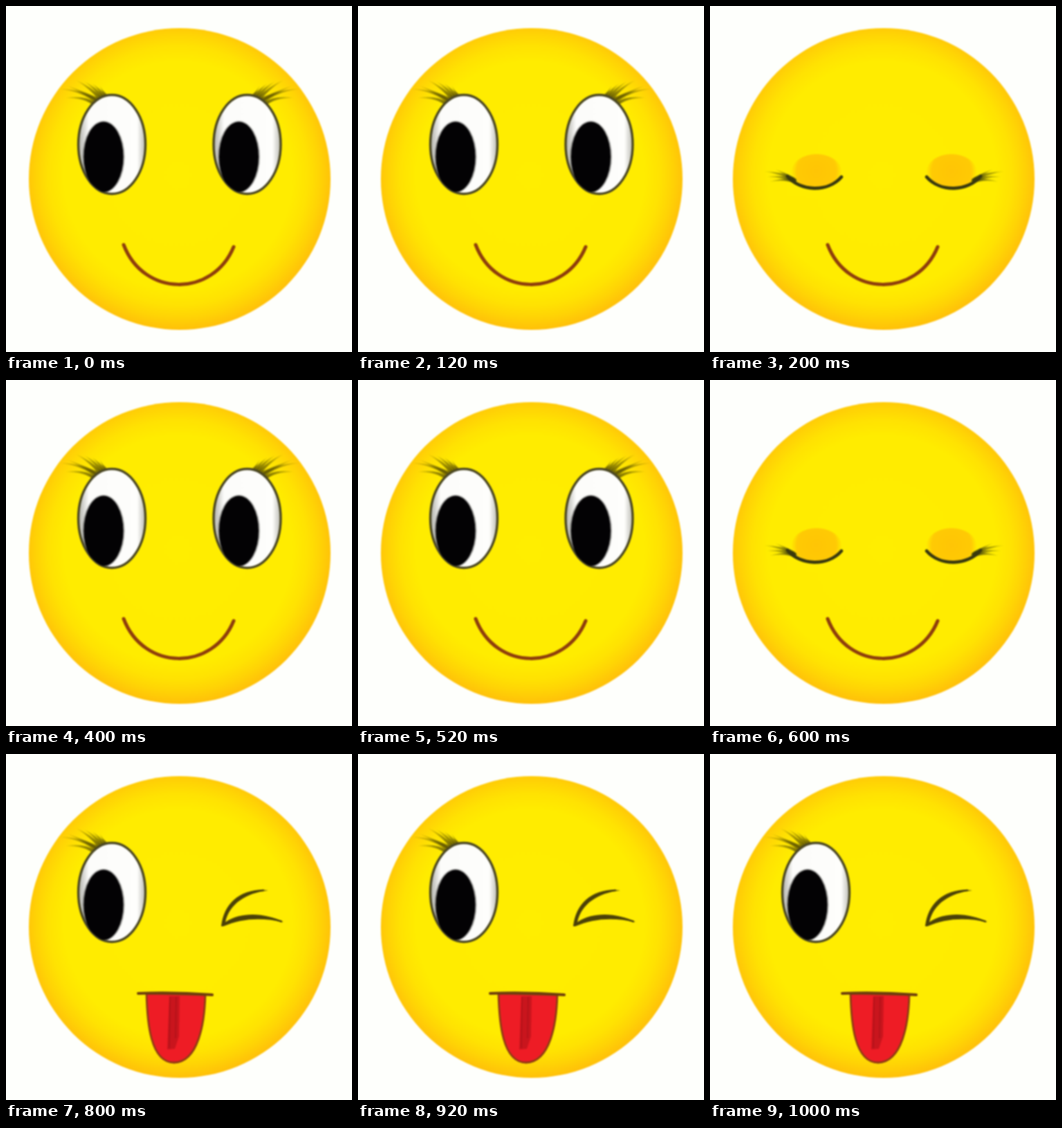
Write an HTML page with a canvas that moves like this. It is 500 px wide and 500 px high and loops after 1200 ms.

```html
<!DOCTYPE html>
<html lang="en">
<head>
<meta charset="utf-8">
<title>Winking smiley</title>
<style>
  html, body { margin: 0; width: 100%; height: 100%; overflow: hidden; background: #fefffc; }
  canvas { display: block; width: 100vw; height: 100vh; filter: blur(1.1px); }
</style>
</head>
<body>
<canvas id="stage" width="500" height="500"></canvas>
<script>
const ctx = document.getElementById('stage').getContext('2d');
const STEP = 200;
const POSES = ['open', 'closed', 'open', 'closed', 'wink', 'wink'];

function stroke(path, color, width) {
  ctx.strokeStyle = color;
  ctx.lineWidth = width;
  ctx.lineCap = 'round';
  ctx.lineJoin = 'round';
  ctx.stroke(new Path2D(path));
}

function ellipse(x, y, rx, ry, fill) {
  ctx.beginPath();
  ctx.ellipse(x, y, rx, ry, 0, 0, Math.PI * 2);
  ctx.fillStyle = fill;
  ctx.fill();
}

function radial(x, y, r, stops) {
  const g = ctx.createRadialGradient(x, y, 0, x, y, r);
  for (const [at, color] of stops) g.addColorStop(at, color);
  return g;
}

// Draws on the right half by reflecting the left half.
function mirrored(axis, draw) {
  ctx.save();
  ctx.translate(axis * 2, 0);
  ctx.scale(-1, 1);
  draw();
  ctx.restore();
}

// Tapered hair from root to tip, fading out.
function lash(x, y, cx, cy, tx, ty, w, color) {
  const g = ctx.createLinearGradient(x, y, tx, ty);
  g.addColorStop(0, `rgba(${color},0.8)`);
  g.addColorStop(0.5, `rgba(${color},0.5)`);
  g.addColorStop(1, `rgba(${color},0.08)`);
  ctx.fillStyle = g;
  ctx.beginPath();
  ctx.moveTo(x - w / 2, y + w / 2);
  ctx.quadraticCurveTo(cx, cy + w / 2, tx, ty);
  ctx.quadraticCurveTo(cx, cy - w / 2, x + w / 2, y - w / 2);
  ctx.fill();
}

function face() {
  ctx.fillStyle = '#fefffc';
  ctx.fillRect(0, 0, 500, 500);
  ellipse(251, 250, 218, 218, radial(249, 245, 223, [
    [0, '#ffee00'], [0.74, '#ffec00'], [0.84, '#ffe202'],
    [0.92, '#ffd305'], [1, '#ffc009']
  ]));
}

function openLashes() {
  const c = '84,74,0';
  lash(129, 142, 112, 130, 86, 133, 4, c);
  lash(132, 139, 112, 122, 78, 120, 4, c);
  lash(134, 136, 116, 127, 88, 115, 4, c);
  lash(136, 134, 122, 118, 101, 107, 4, c);
  lash(139, 132, 128, 118, 113, 109, 4, c);
  lash(142, 131, 135, 120, 124, 112, 4, c);
  lash(145, 130, 140, 124, 135, 115, 3, c);
}

function openEye(x) {
  ctx.save();
  ctx.beginPath();
  ctx.ellipse(x, 200, 48.5, 71.5, 0, 0, Math.PI * 2);
  const g = ctx.createLinearGradient(x - 48, 0, x + 48, 0);
  g.addColorStop(0, '#b0b0aa');
  g.addColorStop(0.15, '#fcfcfa');
  g.addColorStop(0.88, '#fefefc');
  g.addColorStop(1, '#bdbdb6');
  ctx.fillStyle = g;
  ctx.fill();
  ctx.strokeStyle = '#4b4722';
  ctx.lineWidth = 3.4;
  ctx.stroke();
  ctx.clip();
  ellipse(x - 12, 218, 30.5, 52, 'rgba(70,70,66,0.5)');
  ellipse(x - 12, 218, 28.5, 50.5, '#030204');
  ctx.restore();
}

function closedEye() {
  ellipse(154, 239, 36, 25, radial(154, 239, 36, [
    [0, '#ffc505'], [0.8, '#ffca04'], [1, 'rgba(255,215,0,0.25)']
  ]));
  // Clear the lid below the lash line.
  ctx.fillStyle = '#ffed00';
  ctx.fill(new Path2D('M112 245 C130 270 172 270 190 247 L190 275 L112 275 Z'));
  const c = '52,54,8';
  lash(123, 252, 105, 241, 78, 239, 4, c);
  lash(123, 253, 106, 245, 82, 247, 4, c);
  lash(124, 254, 108, 248, 86, 254, 4, c);
  lash(121, 250, 109, 242, 94, 236, 3, c);
  stroke('M112 246 C130 268 170 270 190 247', '#38380f', 4.8);
}

function smile() {
  stroke('M170 345 C199 421 299 421 329 348', '#8d3d0c', 5);
}

function winkEye() {
  const color = '#4b4108';
  ctx.fillStyle = color;
  ctx.fill(new Path2D(
    'M311 249 C315 217 336 195 379 197 C347 201 323 216 317 243 ' +
    'C341 227 376 230 401 243 C370 236 341 237 314 249 Z'));
  stroke('M313 247 C317 217 337 198 372 197', color, 2.6);
  stroke('M313 247 C339 230 371 232 398 242', color, 2.6);
}

function tongue() {
  const d = 'M203 346 C204 386 208 446 243 446 C278 445 287 389 288 348 Z';
  ctx.fillStyle = '#ee1c25';
  ctx.fill(new Path2D(d));
  stroke(d, '#8e3b12', 2.8);
  ctx.fillStyle = '#c9151d';
  ctx.fill(new Path2D('M236 350 L251 350 L250 408 L244 426 L233 427 Z'));
  stroke('M237 352 L236 424 M246 352 L245 410', '#b3131a', 1.8);
  stroke('M191 346 Q244 344 298 348', '#6d3d0c', 4);
}

function draw(pose) {
  face();
  if (pose === 'closed') {
    closedEye();
    mirrored(251.5, closedEye);
  } else {
    openLashes();
    openEye(153);
  }
  if (pose === 'open') {
    mirrored(251, openLashes);
    openEye(348.5);
  }
  if (pose === 'wink') {
    winkEye();
    tongue();
  } else {
    smile();
  }
}

const start = performance.now();
function tick() {
  const t = performance.now() - start;
  draw(POSES[Math.floor(t / STEP) % POSES.length]);
  requestAnimationFrame(tick);
}
tick();
</script>
</body>
</html>
```
